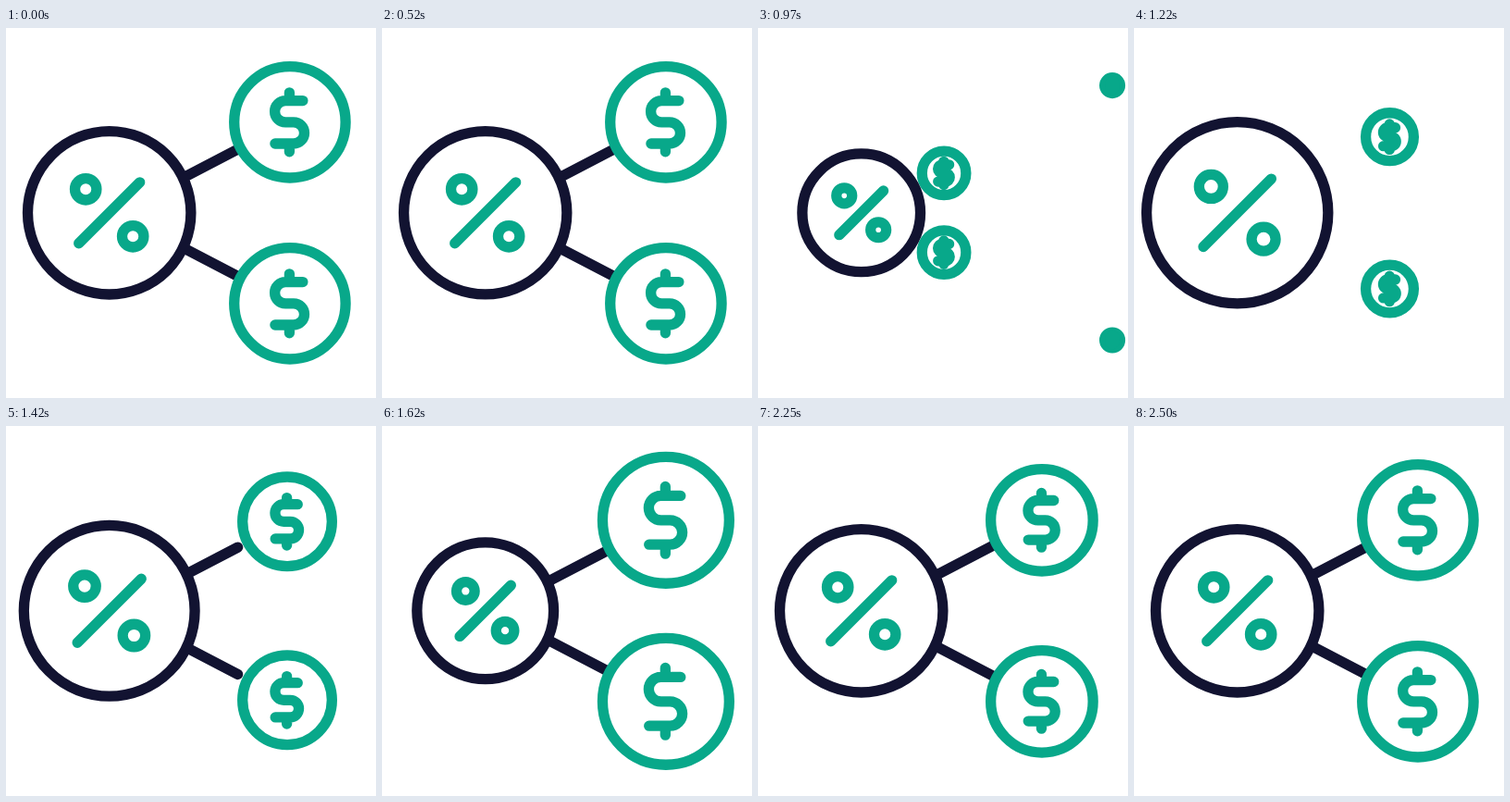
Recreate the animation shown at these times as an HTML page with a canvas. Size 400 px wide and 400 px high, loop 2.52 s.

```html
<!DOCTYPE html>
<html lang="en">
<head>
<meta charset="utf-8">
<title>Commission split</title>
<style>
  html, body { margin: 0; width: 100%; height: 100%; overflow: hidden; background: #fff; }
  canvas { display: block; width: 100vw; height: 100vh; }
</style>
</head>
<body>
<canvas id="stage"></canvas>
<script>
const LOOP = 2520, SIZE = 400, STROKE = 11.3;
const DARK = '#121331', GREEN = '#08a88a';
const HUB = { x: 111.7, y: 199.8, r: 88.2 };
const COIN = { x: 306.9, y: 101.8, r: 60.2 };
const SLOPE = 0.521;

const HUB_SCALE = [[510, 1], [920, 0.7], [1286, 1.15], [1640, 0.835], [2205, 1]];
const COIN_SCALE = [[1155, 0.395], [1660, 1.15], [2000, 0.835], [2500, 1]];
const LEAVING_SCALE = [[632, 1], [1075, 0]];
const LEAVING_X = [[632, COIN.x], [1075, COIN.x + 88.5]];
const ERASE = [[510, 0], [873, 1]];
const GROW = [[1150, 0], [1570, 1]];
const LEAVE_END = 1005, ENTER = 778, ENTER_END = 1510;

const canvas = document.getElementById('stage');
const ctx = canvas.getContext('2d');

const lerp = (a, b, k) => a + (b - a) * k;
const lineY = x => COIN.y + (COIN.x - x) * SLOPE;

// Smooth interpolation through [time, value] steps.
function track(steps, t) {
  if (t <= steps[0][0]) return steps[0][1];
  for (let i = 1; i < steps.length; i++) {
    const [t0, a] = steps[i - 1], [t1, b] = steps[i];
    if (t < t1) {
      const k = (t - t0) / (t1 - t0);
      return lerp(a, b, k * k * (3 - 2 * k));
    }
  }
  return steps[steps.length - 1][1];
}

// Scales the geometry but keeps the line weight.
function shape(x, y, scale, color, build, filled) {
  ctx.save();
  ctx.translate(x, y);
  ctx.scale(scale, scale);
  ctx.beginPath();
  build();
  ctx.restore();
  if (filled) {
    ctx.fillStyle = '#fff';
    ctx.fill();
  }
  ctx.strokeStyle = color;
  ctx.stroke();
}

function ring(x, y, r) {
  ctx.moveTo(x + r, y);
  ctx.arc(x, y, r, 0, Math.PI * 2);
}

function segment(x0, y0, x1, y1) {
  ctx.moveTo(x0, y0);
  ctx.lineTo(x1, y1);
}

function percent() {
  ring(-25.5, -25.5, 11.7);
  ring(25.5, 25.5, 11.7);
  segment(-33, 33, 33, -33);
}

function dollar() {
  const q = Math.PI / 2;
  ctx.moveTo(14, -23.2);
  ctx.lineTo(-4.7, -23.2);
  ctx.arc(-4.7, -11.6, 11.6, -q, q, true);
  ctx.lineTo(4, 0);
  ctx.arc(4, 11.6, 11.6, -q, q);
  ctx.lineTo(-16, 23.2);
  segment(-0.5, -32, -0.5, -23.2);
  segment(-0.5, 23.2, -0.5, 32);
}

function onBothSides(draw) {
  for (const side of [1, -1]) draw(y => HUB.y + side * (y - HUB.y));
}

function drawLink(x0, x1) {
  onBothSides(flip => shape(0, 0, 1, DARK,
    () => segment(x0, flip(lineY(x0)), x1, flip(lineY(x1)))));
}

function drawCoins(x, scale) {
  onBothSides(flip => {
    const y = flip(lineY(x));
    shape(x, y, scale, GREEN, () => ring(0, 0, COIN.r), true);
    shape(x, y, scale, GREEN, dollar);
  });
}

function drawHub(scale) {
  shape(HUB.x, HUB.y, scale, DARK, () => ring(0, 0, HUB.r), true);
  shape(HUB.x, HUB.y, scale, GREEN, percent);
}

function render(t) {
  const w = Math.round(innerWidth * devicePixelRatio);
  const h = Math.round(innerHeight * devicePixelRatio);
  if (canvas.width !== w || canvas.height !== h) {
    canvas.width = w;
    canvas.height = h;
  }
  ctx.setTransform(w / SIZE, 0, 0, h / SIZE, 0, 0);
  ctx.fillStyle = '#fff';
  ctx.fillRect(0, 0, SIZE, SIZE);
  ctx.lineWidth = STROKE;
  ctx.lineCap = ctx.lineJoin = 'round';

  const leavingX = track(LEAVING_X, t);
  const erased = track(ERASE, t), grown = track(GROW, t);
  if (erased < 1) drawLink(lerp(HUB.x, leavingX, erased), leavingX);
  if (grown > 0) drawLink(HUB.x, lerp(HUB.x, COIN.x, grown));

  if (t < LEAVE_END) drawCoins(leavingX, track(LEAVING_SCALE, t));
  if (t > ENTER) {
    const left = 1 - Math.min(1, (t - ENTER) / (ENTER_END - ENTER));
    drawCoins(lerp(COIN.x, HUB.x, left * left), track(COIN_SCALE, t));
  }
  drawHub(track(HUB_SCALE, t));
}

function tick() {
  render(performance.now() % LOOP);
  requestAnimationFrame(tick);
}
tick();
</script>
</body>
</html>
```
